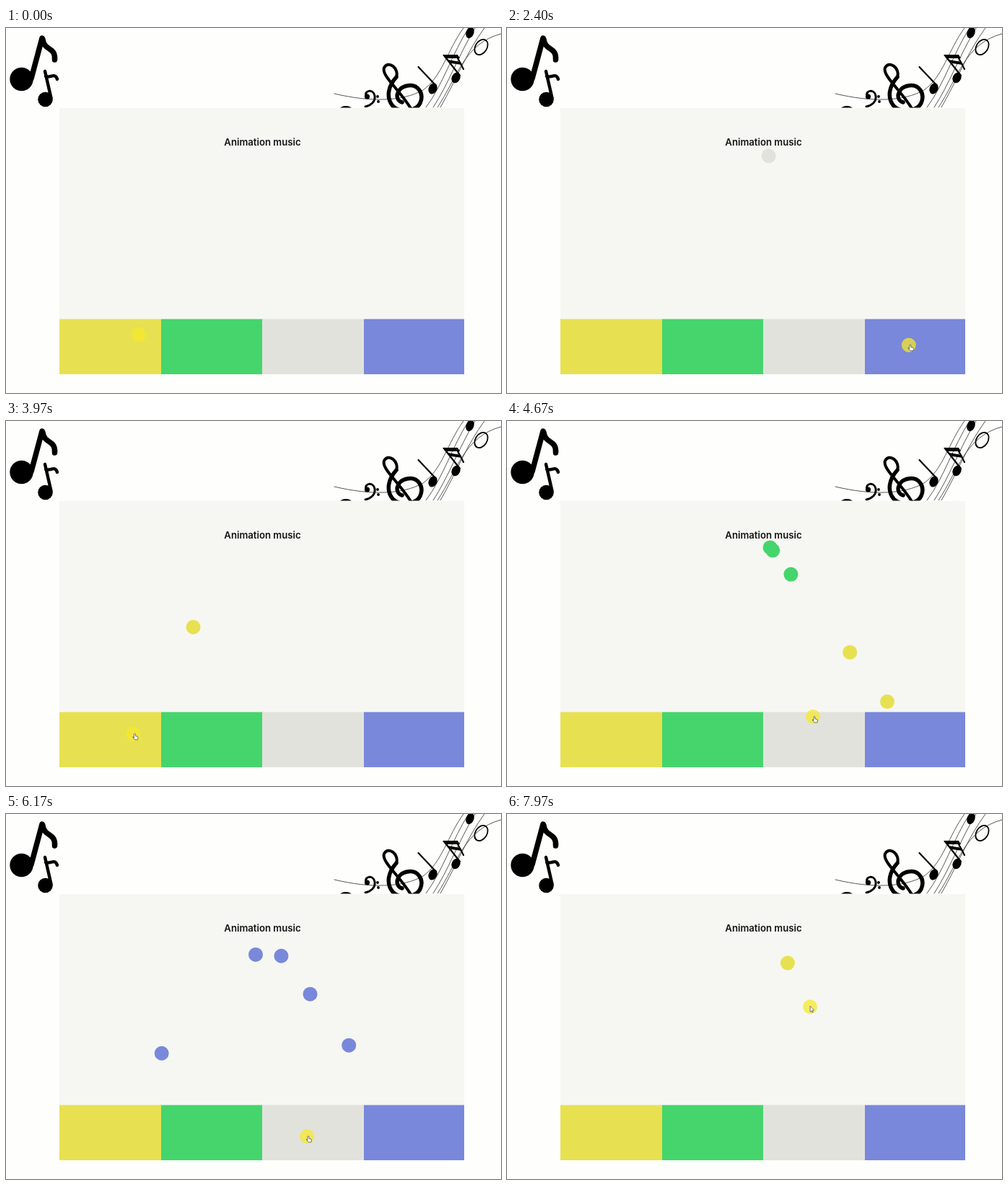
An HTML page for the animation above (8 s loop, 686 by 506 pixels).

```html
<!DOCTYPE html>
<html lang="en">
<head>
<meta charset="utf-8">
<title>Animation music</title>
<style>
  html, body { margin: 0; width: 100%; height: 100%; overflow: hidden; background: #fefefd; }
  svg { display: block; width: 686px; height: 506px; }
  text { font: 600 13.2px Inter, "Open Sans", sans-serif; text-anchor: middle; fill: #151515; }
  .line { fill: none; stroke: #000; stroke-linecap: round; stroke-linejoin: round; }
  .staff { stroke: #444; stroke-width: .9; }
</style>
</head>
<body>
<svg viewBox="0 0 686 506">
  <!-- Pair of notes, top left -->
  <circle cx="21.5" cy="71" r="16.2"/>
  <path class="line" stroke-width="7.5" d="M50 14 L35 70 M51 16 C53 32 69 26 67.5 44"/>
  <circle cx="54.5" cy="99" r="10.3"/>
  <path class="line" stroke-width="4.4" d="M54 60 L62.5 97 M55 67 C61 70 68 61 71 71"/>

  <!-- Flowing staff, top right -->
  <clipPath id="corner"><rect x="440" width="246" height="110.5"/></clipPath>
  <g clip-path="url(#corner)">
    <g class="line staff">
      <path d="M455 91 C505 103 550 102 578 86 C604 68 612 30 634 0"/>
      <path d="M582 110 C606 78 618 36 641 0"/>
      <path d="M592 110 C614 76 626 40 650 0"/>
      <path d="M602 110 C626 68 638 34 663 0"/>
      <path d="M598 110 C626 68 634 22 686 8"/>
    </g>
    <ellipse cx="471" cy="112" rx="8" ry="4"/>
    <path class="line" stroke-width="3" d="M499 95 C496 86 509 84 511 94 C512 102 506 107 498 109"/>
    <circle cx="500.5" cy="95" r="3.6"/>
    <circle cx="515" cy="95" r="1.9"/><circle cx="516" cy="102" r="1.9"/>
    <path class="line" stroke-width="4" d="M541 68 C545 56 530 44 524 55 C520 66 545 85 562 113"/>
    <path class="line" stroke-width="5.5" d="M541 68 C530 80 526 96 536 108 C545 118 568 116 574 104 C580 90 570 77 556 80 C540 83 538 100 549 103"/>
    <ellipse cx="591.5" cy="84" rx="5.8" ry="7.8" transform="rotate(24 591.5 84)"/>
    <path class="line" stroke-width="2.2" d="M571.5 54 L596 80"/>
    <ellipse cx="623.5" cy="69" rx="5.8" ry="7.6" transform="rotate(24 623.5 69)"/>
    <path class="line" stroke-width="2.2" d="M607 38 L629 66 M624 38 L634 57"/>
    <path d="M605 37 L626 37 L629 42 L609 42 Z M612 44 L630 47 L632 51 L617 49 Z"/>
    <ellipse cx="643" cy="6.5" rx="5.4" ry="8" transform="rotate(20 643 6.5)"/>
    <ellipse class="line" stroke-width="1.8" cx="658.5" cy="26.5" rx="8" ry="11.5" transform="rotate(32 658.5 26.5)"/>
  </g>

  <rect x="74" y="111" width="561" height="293" fill="#f6f7f2"/>
  <g id="pads"></g>
  <text x="355.5" y="163">Animation music</text>
  <g id="bubbles"></g>
  <g id="cursor">
    <circle r="10" fill="#f6e82c" fill-opacity=".75"/>
    <g fill="#fff" stroke="#555" stroke-width=".8" stroke-linejoin="round">
      <path id="hand" d="M1 0 Q2 -1 3 0 L3 3 Q7 3 6.5 5 L6 8 L2 8 L-1 4 L1 5 Z"/>
      <path id="arrow" d="M0 -1 L0 7 L2 5.5 L3 8 L4.3 7.4 L3.2 5 L5.5 4.6 Z"/>
    </g>
  </g>
</svg>
<script>
const LOOP = 8000, LIFE = 1000;
const LEFT = 74, PAD_WIDTH = 140.5, PAD_TOP = 403.5;
const COLORS = ["#e7e151", "#45d56c", "#e1e2dc", "#7988da"];
const JUMP = [[84, 470], [365, 175], [533, 397]];

// Time, x, y; the pointer glides from each stop to the next
const STOPS = [
  [0, 184, 425], [960, 150, 438], [1385, 285, 436], [1670, 460, 433],
  [2552, 565, 440], [3170, 218, 440], [3900, 150, 436], [4150, 285, 425],
  [4670, 424, 410], [5478, 560, 440], [6032, 510, 446], [6170, 417, 447],
  [6553, 390, 445], [6700, 285, 442], [7170, 155, 440], [7410, 150, 440],
  [LOOP, 422, 266]
];
// Each click launches a bubble from the pad under the pointer
const CLICKS = [
  962, 1387, 1960, 2554, 3790, 3980, 4100, 4154, 4197, 4760, 4960,
  5480, 5562, 5620, 5830, 6032, 6424, 6554, 6632, 6772, 7407
];

const $ = id => document.getElementById(id);
const show = (el, visible) => el.setAttribute("visibility", visible ? "visible" : "hidden");
const moveTo = (el, [x, y]) => el.setAttribute("transform", `translate(${x} ${y})`);
const mix = (from, to, k) => from.map((value, i) => value + (to[i] - value) * k);

function add(parent, tag, attrs) {
  const el = document.createElementNS("http://www.w3.org/2000/svg", tag);
  for (const name in attrs) el.setAttribute(name, attrs[name]);
  return parent.appendChild(el);
}

// cubic-bezier(.25, .1, .25, 1)
function ease(time) {
  const bezier = (s, a, b) => 3 * (1 - s) ** 2 * s * a + 3 * (1 - s) * s * s * b + s ** 3;
  let low = 0, high = 1;
  for (let i = 0; i < 20; i++) {
    const mid = (low + high) / 2;
    if (bezier(mid, .25, .25) < time) low = mid; else high = mid;
  }
  return bezier(low, .1, 1);
}

function jump(progress) {
  const leg = progress < .5 ? 0 : 1;
  return mix(JUMP[leg], JUMP[leg + 1], ease(progress * 2 - leg));
}

function pointerAt(t) {
  const i = STOPS.findIndex(([time]) => time > t);
  const [start, ...from] = STOPS[i - 1], [end, ...to] = STOPS[i];
  const k = (t - start) / (end - start);
  return mix(from, to, k * k * (3 - 2 * k));
}

COLORS.forEach((fill, i) => {
  const x = Math.round(LEFT + i * PAD_WIDTH);
  add($("pads"), "rect", { x, y: PAD_TOP, width: Math.min(141, 635 - x), height: 76.5, fill });
});

const bubbles = CLICKS.map(start => {
  const pad = Math.floor((pointerAt(start)[0] - LEFT) / PAD_WIDTH);
  return { start, el: add($("bubbles"), "circle", { r: 10, fill: COLORS[pad] }) };
});

function draw(t) {
  for (const { start, el } of bubbles) {
    const progress = (t - start) / LIFE, alive = progress >= 0 && progress < 1;
    show(el, alive);
    if (alive) moveTo(el, jump(progress));
  }
  const pointer = pointerAt(t), overPads = pointer[1] > PAD_TOP;
  moveTo($("cursor"), pointer);
  show($("hand"), overPads && t >= 60);
  show($("arrow"), !overPads);
}

const begin = performance.now();
function tick() {
  draw((performance.now() - begin) % LOOP);
  requestAnimationFrame(tick);
}
tick();
</script>
</body>
</html>
```
